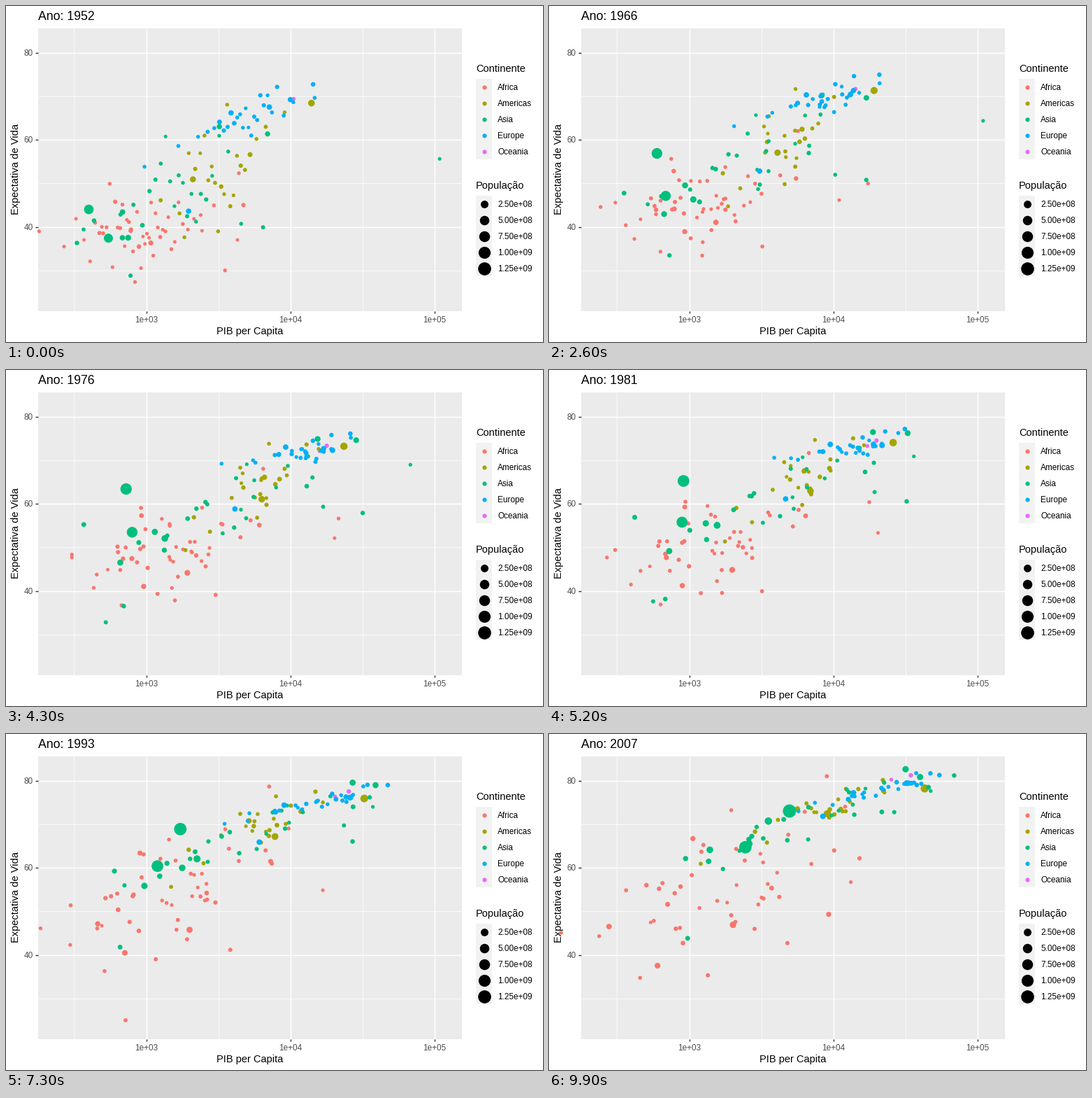
A matplotlib script for the animation above (10 s loop, 768 by 480 pixels).

```python
import numpy as np
import matplotlib.pyplot as plt
from matplotlib.animation import FuncAnimation
from matplotlib.patches import Rectangle

plt.rcParams["font.family"] = "Liberation Sans"
W, H, DPI = 768, 480, 96
PX = 72 / DPI
FRAMES = 100
YEARS = np.linspace(1952, 2007, FRAMES)
KNOTS = (1952, 1977, 1992, 2007)
POP_MAX = 1318.7  # millions
rng = np.random.default_rng(7)


def x_px(log_gdp):
    return 200.5 + 206.25 * (log_gdp - 3)


def y_px(life):
    return 66.5 + 6.225 * (80 - life)


def diameter(size):
    return size * 72.27 / 25.4 + 1.89


def pop_size(pop):
    return 1 + 5 * np.sqrt(pop / POP_MAX)


def scores(n):
    """Evenly spread, roughly normal values in random order."""
    u = (rng.permutation(n) + .5) / n
    return np.log(u / (1 - u)) / 1.75


def cloud(n, pop, trend):
    """Seeded dots around a line of life over log gdp that moves with time.

    trend: one row per knot year with mean and spread of log gdp,
    mean life, its slope and its spread.
    """
    mean, spread, life, slope, noise = (
        np.interp(YEARS, KNOTS, c)[:, None] for c in zip(*trend))
    turn = np.linspace(0, .8, FRAMES)[:, None]
    z, e = (scores(n) * np.cos(turn) + scores(n) * np.sin(turn) for _ in "xy")
    top = 73 + .165 * (YEARS[:, None] - YEARS[0])
    g = mean + spread * z
    y = np.minimum(life + slope * spread * z + noise * e, top - .4 * np.abs(e))
    return g, y, np.tile(pop * np.exp(.9 * scores(n)), (FRAMES, 1))


def hero(pop, *path):
    """One dot along (year, gdp, life) points."""
    t, g, e = zip(*path)
    return (np.interp(YEARS, t, np.log10(g)), np.interp(YEARS, t, e),
            np.full(FRAMES, pop))


def continent(growth, heroes, swarm=None):
    g, y, p = (np.column_stack(c) for c in zip(*heroes))
    if swarm:
        g, y, p = (np.hstack(c) for c in zip(swarm, (g, y, p)))
    p = p * np.interp(YEARS, (1952, 2007), (growth, 1))[:, None]
    return x_px(g), y_px(y), diameter(pop_size(p))


oceania = continent(.45, [
    hero(20, (1952, 10040, 69.1), (1977, 18334, 73.5), (2007, 34435, 81.2)),
    hero(4, (1952, 10557, 69.4), (1977, 16234, 72.2), (2007, 25185, 80.2))])

africa = continent(.27, [
    hero(135, (1952, 1077, 36.3), (1977, 1982, 44.5), (2007, 2014, 46.9)),
    hero(9, (1952, 493, 40), (1977, 670, 45), (1987, 848, 44),
         (1992, 737, 23.6), (1997, 590, 36.1), (2007, 863, 46.2)),
    hero(1.5, (1952, 4293, 37), (1977, 21746, 52.8), (2007, 13206, 56.7)),
    hero(6, (1952, 2388, 42.7), (1967, 18773, 50.2), (1977, 21951, 57.4),
         (1992, 9640, 68.8), (2007, 12057, 74)),
    hero(44, (1952, 4725, 45), (1992, 7225, 61.9), (2007, 9270, 49.3)),
    hero(12, (1952, 3521, 30), (1977, 3009, 39.5), (2007, 4797, 42.7)),
    hero(65, (1952, 781, 39.1), (1977, 796, 47.8), (2007, 278, 46.5)),
], cloud(45, 8, [(2.95, .27, 39.3, 6, 4.6), (3.14, .27, 49.7, 9, 5.2),
                 (3.13, .31, 54, 13, 6.2), (3.21, .37, 55.3, 11, 7.5)]))

americas = continent(.5, [
    hero(301, (1952, 13990, 68.4), (1977, 24073, 73.4), (2007, 42952, 78.2)),
    hero(190, (1952, 2109, 50.9), (1977, 6660, 61.5), (2007, 9066, 72.4)),
    hero(8, (1952, 1840, 37.6), (1977, 1874, 49.9), (2007, 1202, 60.9)),
], cloud(22, 10, [(3.53, .2, 53.5, 18, 6.5), (3.8, .2, 65, 14, 4),
                  (3.8, .23, 70, 9, 3), (3.97, .25, 73.8, 8, 2.2)]))

asia = continent(.4, [
    hero(1319, (1952, 400, 44), (1957, 576, 50.5), (1962, 488, 44.5),
         (1967, 613, 58.4), (1977, 741, 64), (1992, 1656, 68.7),
         (2007, 4959, 73)),
    hero(1110, (1952, 547, 37.4), (1977, 813, 54.2), (1992, 1164, 60.2),
         (2007, 2452, 64.7)),
    hero(127, (1952, 3217, 63), (1977, 16610, 75.4), (1992, 26825, 79.4),
         (2007, 31656, 82.6)),
    hero(224, (1952, 750, 37.5), (1977, 1383, 52.7), (2007, 3541, 70.7)),
    hero(150, (1952, 684, 37.5), (1977, 660, 46.9), (2007, 1391, 64.1)),
    hero(169, (1952, 685, 43.4), (1977, 1176, 54), (2007, 2606, 65.5)),
    hero(2.5, (1952, 108382, 55.6), (1972, 109348, 67.7), (1977, 59265, 69.3),
         (1982, 31354, 71.3), (2007, 47307, 77.6)),
    hero(28, (1952, 6460, 39.9), (1977, 34168, 58.7), (2007, 21655, 72.8)),
    hero(32, (1952, 779, 28.8), (1992, 649, 41.7), (2007, 975, 43.8)),
    hero(14, (1952, 368, 39.4), (1967, 523, 45.4), (1977, 525, 31.2),
         (1992, 683, 55.8), (2007, 1714, 59.7)),
    hero(48, (1952, 331, 36.3), (1977, 371, 56.1), (2007, 944, 62.1)),
], cloud(22, 17, [(3.24, .28, 49, 11, 6), (3.7, .4, 61.5, 12, 4),
                  (3.82, .45, 68.5, 10, 2.5), (3.95, .47, 72.3, 9, 2.6)]))

europe = continent(.75, [
    hero(82, (1952, 7144, 67.5), (1977, 20513, 72.5), (2007, 32170, 79.4)),
    hero(71, (1952, 1969, 43.6), (1977, 4269, 59.5), (2007, 8458, 71.8)),
    hero(5, (1952, 974, 53.8), (1977, 3528, 69.9), (2007, 7446, 74.9)),
    hero(7.5, (1952, 14734, 69.6), (1977, 26982, 75.4), (2007, 37506, 81.7)),
    hero(61, (1952, 9980, 69.2), (1977, 17429, 72.8), (2007, 33203, 79.4)),
], cloud(25, 10, [(3.69, .21, 65.3, 14, 2.2), (4.1, .15, 72.2, 6, 1.4),
                  (4.17, .25, 74.8, 8, .9), (4.35, .22, 78, 9, .8)]))

COLORS = {"Africa": "#F8766D", "Americas": "#A3A500", "Asia": "#00BF7D",
          "Europe": "#00B0F6", "Oceania": "#E76BF3"}
LAYERS = [("Oceania", oceania), ("Africa", africa), ("Americas", americas),
          ("Asia", asia), ("Europe", europe)]

fig = plt.figure(figsize=(W / DPI, H / DPI), dpi=DPI, facecolor="white")
ax = fig.add_axes([0, 0, 1, 1])
ax.set(xlim=(0, W), ylim=(H, 0))
ax.axis("off")

L, R, T, B = 45.7, 652, 32, 435.5


def box(x, y, w, h, color):
    ax.add_patch(Rectangle((x, y), w, h, fc=color, lw=0, zorder=0))


def line(x, y, color, width):
    ax.plot(x, y, color=color, lw=width * PX, solid_capstyle="butt", zorder=1)


def label(x, y, s, size, color="black", **kw):
    return ax.text(x, y, s, fontsize=size, color=color, va="baseline", **kw)


def dots(x, y, d, color):
    return ax.scatter(x, y, s=(np.asarray(d) * PX) ** 2, c=color, lw=0, zorder=3)


box(L, T, R - L, B - T, "#EBEBEB")
for e in (2.5, 3.5, 4.5):
    line([x_px(e)] * 2, [T, B], "white", .71)
for v in (70, 50, 30):
    line([L, R], [y_px(v)] * 2, "white", .71)
for e in (3, 4, 5):
    x = x_px(e)
    line([x, x], [T, B], "white", 1.42)
    line([x, x], [B, B + 3.67], "#333333", 1.42)
    label(x, 451.5, f"1e+0{e}", 8.8, "#4D4D4D", ha="center")
for v in (80, 60, 40):
    y = y_px(v)
    line([L, R], [y, y], "white", 1.42)
    line([L - 3.67, L], [y, y], "#333333", 1.42)
    label(39, y + 4.2, str(v), 8.8, "#4D4D4D", ha="right")

title = label(L, 20, "", 13.2)
label(349, 469, "PIB per Capita", 11, ha="center")
label(18, 233.5, "Expectativa de Vida", 11, ha="center",
      rotation=90, rotation_mode="anchor")


def legend(top, heading, names, sizes, colors):
    label(672, top - 9.5, heading, 11)
    box(672, top, 23, 115, "#F2F2F2")
    for k, (name, size, color) in enumerate(zip(names, sizes, colors)):
        y = top + 11.5 + 23 * k
        dots([683.7], [y], [diameter(size)], color)
        label(703, y + 4.2, name, 8.8)


pops = [250 * k for k in range(1, 6)]
legend(104, "Continente", COLORS, [1.5] * 5, COLORS.values())
legend(271, "População", [f"{p * 1e6:.2e}" for p in pops],
       [pop_size(p) for p in pops], ["black"] * 5)

clouds = [(dots(x[0], y[0], d[0], COLORS[name]), x, y, d)
          for name, (x, y, d) in LAYERS]


def update(i):
    title.set_text(f"Ano: {YEARS[i]:.0f}")
    for group, x, y, d in clouds:
        group.set_offsets(np.column_stack([x[i], y[i]]))
        group.set_sizes((d[i] * PX) ** 2)
    return [title] + [c[0] for c in clouds]


anim = FuncAnimation(fig, update, frames=FRAMES, interval=100,
                     repeat=True, repeat_delay=0)
plt.show()
```
